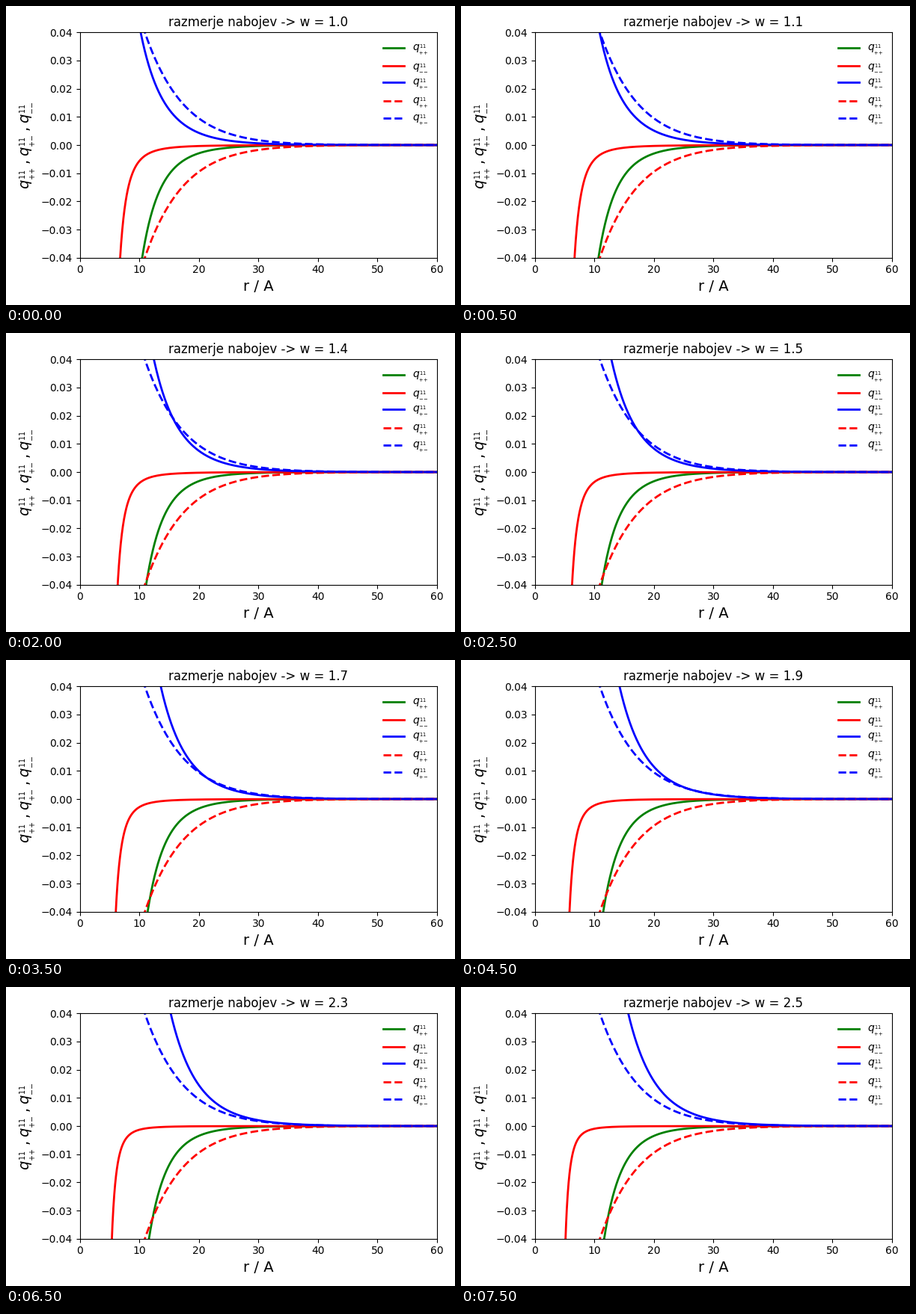
Recreate the animation shown at these times as a matplotlib script. Size 600x400 px, loop 8 s.

```python
import numpy as np
import matplotlib.pyplot as plt
from matplotlib.animation import FuncAnimation
from matplotlib.lines import Line2D
from matplotlib.transforms import Affine2D

W, H, DPI = 600, 400, 100
FRAMES, STEP = 16, 500
LIMIT = 0.04

plt.rcParams["font.family"] = "DejaVu Sans"


def q(sub):
    return r"q_{_{%s}}^{_{11}}" % "".join("{%s}" % s for s in sub)


def decay(r, r0, k, n):
    """Screened power law that equals LIMIT at r0."""
    return LIMIT * np.exp(-k * (r - r0)) * (r0 / r) ** n


def plus_plus(r, w):
    rise = 1 - np.exp(-1.9 * (w - 1))
    return -decay(r, 10.45 + 1.25 * rise, 0.136 + 0.025 * rise, 2.04)


def minus_minus(r, w):
    d = w - 1
    r0 = 6.75 - 1.02 * d - 0.04 * d**2
    return -LIMIT * ((r0 - 3) / (r - 3)) ** 3.15


def plus_minus(r, w):
    d = w - 1
    return (1 + 1.87 * d - 0.03 * d**3) * decay(r, 10.2, 0.1473, 1.168)


def reference(r):
    u = r - 10.9
    return LIMIT * np.exp(-0.153 * u - 0.0006 * u**2)


fig = plt.figure(figsize=(W / DPI, H / DPI), dpi=DPI, facecolor="white")
fig.subplots_adjust(left=0.1648, right=0.9598, bottom=0.1582, top=0.9117)
ax = fig.add_subplot()
ax.set(xlim=(0, 60), ylim=(-LIMIT, LIMIT))
ax.set_yticks(np.linspace(-LIMIT, LIMIT, 9))
ax.set_xlabel("r / A", fontsize=14)
names = [q(sub) for sub in ("++", "+-", "--")]
ax.set_ylabel("$" + r"\:$,$\:".join(names) + "$", fontsize=14, labelpad=2.6)
title = ax.set_title("", fontsize=12)

r = np.linspace(4, 60, 1500)
curves = [
    (ax.plot([], [], color=color, lw=2)[0], func)
    for color, func in (("green", plus_plus), ("red", minus_minus), ("blue", plus_minus))
]
ax.plot(r, -reference(r), "--", color="red", lw=2)
ax.plot(r, reference(r), "--", color="blue", lw=2)

# Frameless legend, laid out in pixels from the top left corner
px = Affine2D().scale(1 / W, -1 / H).translate(0, 1) + fig.transFigure
entries = [(56, "green", "-", "++"), (80, "red", "-", "--"), (102, "blue", "-", "+-"),
           (127, "red", "--", "++"), (150, "blue", "--", "+-")]
for y, color, style, sub in entries:
    fig.add_artist(Line2D([504.3, 532.1], [y, y], color=color, ls=style, lw=2, transform=px))
    fig.text(543.2, y + 4.5, f"${q(sub)}$", fontsize=10, va="baseline", transform=px)


def update(i):
    w = 1 + i / 10
    for line, func in curves:
        line.set_data(r, func(r, w))
    title.set_text(f"razmerje nabojev -> w = {w:.1f}")
    return [line for line, _ in curves] + [title]


anim = FuncAnimation(fig, update, frames=FRAMES, interval=STEP, repeat=True, repeat_delay=0)
plt.show()
```
